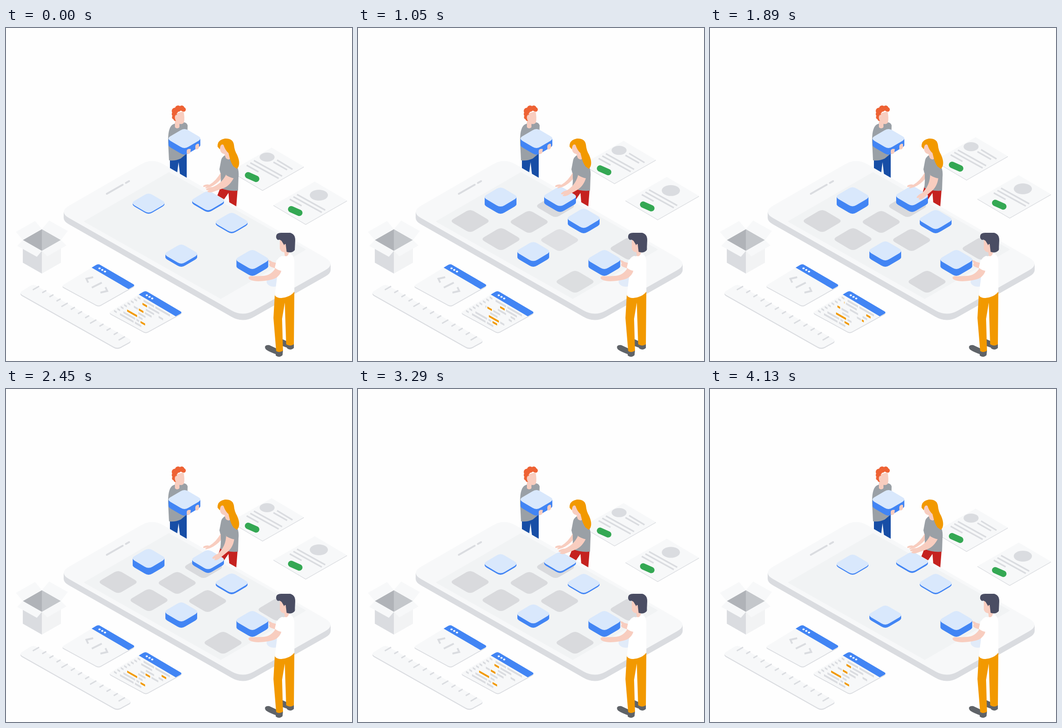
An HTML page for the animation above (4.2 s loop, 762 px wide and 735 px high).

```html
<!DOCTYPE html>
<html lang="en">
<head>
<meta charset="utf-8">
<title>Building an app</title>
<style>
html, body { margin: 0; width: 100%; height: 100%; overflow: hidden; background: #fefefe; }
svg { display: block; width: 762px; height: 735px; }
</style>
</head>
<body>
<svg id="stage" viewBox="0 0 762 735" xmlns="http://www.w3.org/2000/svg"></svg>
<script>
const LOOP = 4200, STEP = 70;
const PALE = '#f7f8f9', GREY = '#dadce0', BLUE = '#4285f4', SKY = '#d9e8fc';
const SKIN = '#f8cdbf', SHIRT = '#9aa0a6', AMBER = '#f29900', SHOE = '#5f6368';

const path = (d, fill, extra = '') => `<path d="${d}" fill="${fill}" ${extra}/>`;
const line = (d, color, width, cap = 'butt') =>
  path(d, 'none', `stroke="${color}" stroke-width="${width}" stroke-linecap="${cap}"`);
const oval = (x, y, rx, ry, fill) => `<ellipse cx="${x}" cy="${y}" rx="${rx}" ry="${ry}" fill="${fill}"/>`;

// Closed polygon with every corner cut back by r and rounded.
function rounded(pts, r, dy = 0) {
  const n = pts.length;
  const toward = (p, q) => {
    const k = r / Math.hypot(q[0] - p[0], q[1] - p[1]);
    return `${(p[0] + (q[0] - p[0]) * k).toFixed(2)} ${(p[1] + (q[1] - p[1]) * k + dy).toFixed(2)}`;
  };
  return pts.map((p, i) =>
    `${i ? 'L' : 'M'}${toward(p, pts[(i + n - 1) % n])}Q${p[0]} ${p[1] + dy} ${toward(p, pts[(i + 1) % n])}`
  ).join('') + 'Z';
}

// Sides of an extruded left-top-right-bottom shape.
function sides(pts, r, h) {
  const [l, , rt] = pts, inset = r * 0.43;
  const x1 = l[0] + inset, x2 = rt[0] - inset;
  return rounded(pts, r, h) + `M${x1} ${l[1]}L${x2} ${rt[1]}V${rt[1] + h}L${x1} ${l[1] + h}Z`;
}
const slab = (pts, r, h, top = PALE, side = GREY) =>
  path(sides(pts, r, h), side) + path(rounded(pts, r), top);

const diamond = (x, y, w, h) => [[x - w, y], [x, y - h], [x + w, y], [x, y + h]];
const blockShape = (x, y) => diamond(x, y, 39.3, 23.5);
const block = (x, y, h) => slab(blockShape(x, y), 10, h, SKY, BLUE);

// Rise during a..b, fall during c..d.
const ease = (t, a, b) => {
  const x = Math.min(1, Math.max(0, (t - a) / (b - a)));
  return x * x * (3 - 2 * x);
};
const swell = (t, [a, b, c, d]) => ease(t, a, b) - ease(t, c, d);

// x, bottom y, resting height, growth, timing
const blocks = [
  [314, 410, 2.5, 14, [0, 1200, 2200, 3500]],
  [445, 406, 3.8, 10.7, [200, 1300, 1900, 2900]],
  [497, 453, 3, 9.2, [0, 1200, 1400, 2700]],
  [386, 527, 7, 7, [200, 1400, 2700, 3700]]
];
// x, y, fade-in start, fade-in end
const tiles = [
  [247, 426, 0, 800], [315, 466, 0, 1050], [377, 428, 100, 1200], [444, 468, 150, 1500],
  [478, 560, 200, 1350], [597, 487, 0, 1050], [435, 393, 0, 1050]
];
const docs = [
  { x: 585, y: 264, rise: 23, times: [0, 1750, 2450, 4200] },
  { x: 680, y: 339, rise: 14, times: [0, 1600, 2600, 4200] }
];
// Code rows: bars as [start, length, highlighted], optional slide and timing
const rows = [
  { bars: [[10, 23], [36, 32]] },
  { bars: [[15, 10, 1], [28, 24]], slide: 50, times: [450, 2300, 2300, 2900] },
  { bars: [[30, 18], [58, 10]] },
  { bars: [[11, 9], [22, 10, 1], [35, 15]], slide: 54, times: [0, 1250, 1400, 3000] },
  { bars: [[28, 16]] },
  { bars: [[11, 22, 1], [36, 9]], slide: 24, times: [250, 1250, 1200, 2500] },
  { bars: [[10, 26], [39, 6], [48, 10, 1]] },
  { bars: [[10, 30], [43, 14]] }
];
const ROW_W = 58;

function drawDoc(d, i) {
  const lines = 'M-39 28.5L23 63M-47 33.5L15.5 68M-55 39L-29 53.5' + (i ? '' : 'M12 27.5L46 48M4 32L34 49');
  return `<g class="doc">` +
    path('M-91 52L71 42V43.5L-20 95.5L-91 53.5Z', GREY) +
    path('M0 0L71 42L-20 94L-91 52Z', PALE) +
    (i ? oval(9, 30, 20, 12, GREY) : oval(-10, 21, 16.5, 10, GREY)) +
    line(lines, GREY, 3.4) +
    line('M-52 61L-34 69', '#34a853', 14, 'round') + '</g>';
}

function drawWindow(pts, id, dots) {
  const [, t, r] = pts;
  const bar = `M${t}L${r}L${r[0] - 15} ${r[1] + 8.5}L${t[0] - 15} ${t[1] + 8.5}Z`;
  return slab(pts, 6, 2) +
    `<clipPath id="${id}"><path d="${rounded(pts, 6)}"/></clipPath>` +
    path(bar, BLUE, `clip-path="url(#${id})"`) +
    [0, 1, 2].map(k => oval(dots[0] + k * 6, dots[1] + k * 3.5, 2.5, 2, '#fff')).join('');
}

function drawRow({ bars }, k) {
  const set = bars.map(([s, w, hot]) =>
    `<rect x="${s}" y="-2.2" width="${w}" height="4.4" fill="${hot ? AMBER : GREY}"/>`).join('');
  return `<g transform="matrix(1 .57 0 1 ${293 - 7.45 * k} ${596 + 4.25 * k})">` +
    `<rect x="-3" y="-2" width="6" height="4" fill="${GREY}"/>` +
    `<g clip-path="url(#row)"><g class="row">${set}<g transform="translate(${-ROW_W})">${set}</g></g></g></g>`;
}

function drawRuler() {
  let d = '';
  for (let i = 0; i < 13; i++) {
    const k = i % 4 ? 9 : 14;
    d += `M${73 + i * 15.75} ${570 + i * 9.25}l${-k} ${k * 0.57}`;
  }
  return slab([[28, 585], [60, 565], [278, 690], [245, 708]], 9, 2.5) + line(d, GREY, 3);
}

const drawBox = () =>
  path('M37 468L79 444V492Z', '#b0b3b8') + path('M79 444L121 468L79 492Z', '#c4c7cb') +
  path('M37 468L79 492V542L37 518Z', GREY) + path('M79 492L121 468V518L79 542Z', '#f2f3f4') +
  path('M37 468L79 444L64 426L22 450ZM79 444L121 468L136 448L95 425Z', PALE) +
  path('M37 468L79 492L68 505L25 481ZM79 492L121 468L133 480L91 504Z', PALE);

function drawCarrier() {
  const curls = [[372, 183, 7], [379, 178, 7], [387, 177, 6], [391, 180, 5], [371, 190, 6], [370, 197, 4.5], [373, 201, 4]];
  return path('M361 286L398 274V332L383 322L380 296L377 320L361 312Z', '#174ea6') +
    path('M372 211C360 214 357 228 357 250L359 292Q372 294 385 288L398 277L400 215Q398 208 390 208Z', SHIRT) +
    path('M372 203V219Q377 224 382 219V207Z', SKIN) +
    curls.map(([x, y, r]) => oval(x, y, r, r, '#ee6234')).join('') +
    path('M376 188L391 184Q394 198 392 208Q389 214 380 211L373 203Q370 194 375 191L377 196Z', SKIN) +
    block(393, 244, 14.5) +
    path('M398 271Q399 266 407 267L406 275Q403 280 398 277ZM417 260Q420 254 425 256L425 264Q422 270 417 267Z', SKIN);
}

const drawWoman = () =>
  path('M472 350Q490 360 510 357L507 396L492 390L490 364L479 380L463 376L470 358Z', '#c5221f') +
  path('M482 281Q474 285 473 296L470 312Q474 325 473 340L472 353Q490 361 511 359L512 330Q514 308 505 303Q497 292 492 283Z', SHIRT) +
  path('M470 254L472 271Q475 278 481 278L484 287Q490 293 494 288L492 272L480 252Z', SKIN) +
  path('M466 262Q465 247 482 244Q500 243 502 258Q503 270 509 280Q516 296 512 306Q509 312 505 311Q496 300 493 288L490 276Q483 270 479 258Q472 254 471 268Z', AMBER);

const drawWomanArms = () =>
  path('M473 319V334Q462 346 450 351L440 354Q437 352 443 350L435 351Q433 349 436 347Q442 344 448 346Q463 337 473 319Z', SKIN) +
  `<g id="arm">` +
  path('M487 318L503 328Q494 348 478 354L458 361Q448 365 443 361L447 358Q440 359 441 355Q447 351 455 351Q478 342 487 318Z', SKIN) +
  '</g>' +
  path('M485 308Q497 300 507 310Q512 322 504 332Q495 331 485 325Z', SHIRT);

const drawBuilder = () =>
  path('M571 702Q574 699 580 700L597 708V721Q580 715 573 710Q569 706 571 702ZM594 712H610L609 722Q602 729 594 723Z', SHOE) +
  path('M609 687L620 692V706L609 702ZM617 699L634 697V706Q627 713 619 707Z', SHOE) +
  path('M592 588L589 640L595 713Q603 718 610 712L608 642L614 606L617 698Q626 704 634 698L635 580Z', AMBER) +
  path('M577 512Q583 513 586 516L597 519L594 531L583 527Q577 523 581 520Z', SKIN) +
  path('M608 503Q596 507 594 524L597 550L592 590Q596 596 606 596Q626 594 635 582V515Q634 499 622 496Q616 506 608 503Z', '#fff') +
  path('M594 529L607 534Q604 547 592 553Q580 558 556 559Q535 558 534 551Q536 546 545 548L568 547Q585 545 594 529Z', SKIN) +
  path('M596 512Q608 508 613 518Q614 530 608 536Q600 536 592 529Z', '#fff') +
  path('M603 468V487Q605 494 613 495L614 503Q620 506 623 497L619 476L608 467Z', SKIN) +
  path('M595 459Q596 452 606 452H626Q637 455 637 468L636 490Q630 498 618 494L616 477Q613 476 613 480L607 470Q603 466 599 468Q594 465 595 459Z', '#4a4d63');

const phone = [[115, 406], [322, 286.5], [727, 521], [521.5, 637.5]];
document.getElementById('stage').innerHTML =
  `<clipPath id="row"><rect x="10" y="-4" width="${ROW_W}" height="8"/></clipPath>` +
  docs.map(drawDoc).join('') + drawCarrier() + drawWoman() +
  slab(phone, 28, 14) +
  path('M171 427L359 318L661 489L473 598Z', '#f1f3f4') +
  line('M222 366L257 346M264 342L271 338', GREY, 4, 'round') +
  oval(590, 560, 16, 11, '#e1ebf9') +
  tiles.map(([x, y]) => path(rounded(diamond(x, y, 45, 26.5), 10), '#d9dadd', 'class="tile"')).join('') +
  blocks.map(() => `<g class="block">${path('', BLUE)}${path('', SKY)}</g>`).join('') +
  block(542.5, 511, 15) + drawWomanArms() + drawBuilder() + drawBox() + drawRuler() +
  drawWindow([[122, 569.5], [203, 520], [285, 568], [204, 614]], 'w1', [206, 530.5]) +
  line('M192 550L177 553.5L181 562M189 573L211 562M208 584L223 580.5L219 572', GREY, 4) +
  drawWindow([[226, 628], [307, 579.5], [389, 628], [308, 673]], 'w2', [310, 590]) +
  rows.map(drawRow).join('');

const all = name => [...document.querySelectorAll('.' + name)];
const docEls = all('doc'), tileEls = all('tile'), blockEls = all('block'), rowEls = all('row');
const arm = document.getElementById('arm');
const move = (el, x, y) => el.setAttribute('transform', `translate(${x} ${y})`);

function render(t) {
  docs.forEach((d, i) => move(docEls[i], d.x, d.y - d.rise * swell(t, d.times)));
  tiles.forEach(([, , a, b], i) => tileEls[i].setAttribute('opacity', swell(t, [a, b, 3450, 4130])));
  blocks.forEach(([x, bottom, rest, grow, times], i) => {
    const h = rest + grow * swell(t, times);
    const shape = blockShape(x, bottom - 21 - h);
    const [side, top] = blockEls[i].children;
    side.setAttribute('d', sides(shape, 10, h));
    top.setAttribute('d', rounded(shape, 10));
  });
  rows.forEach((r, i) => r.slide && move(rowEls[i], r.slide * swell(t, r.times), 0));
  arm.setAttribute('transform', `rotate(${-21 * swell(t, [300, 1800, 2300, 3500])} 497 326)`);
}

const start = performance.now();
function tick() {
  const t = (performance.now() - start) % LOOP;
  render(Math.floor(t / STEP) * STEP);
  requestAnimationFrame(tick);
}
tick();
</script>
</body>
</html>
```
